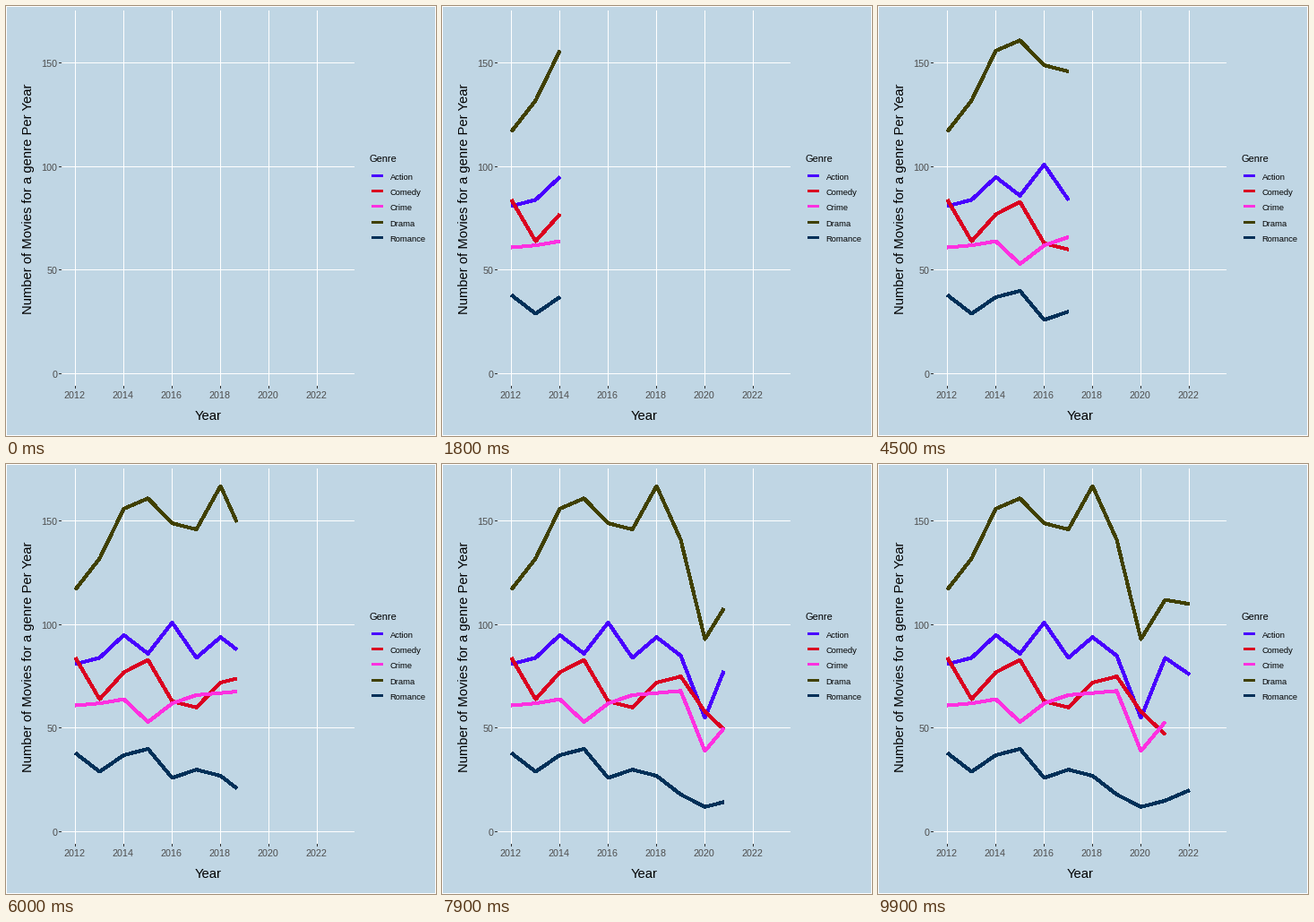
A matplotlib script that plays this animation: 480x480 px, repeating every 10 s.

```python
import matplotlib.pyplot as plt
import numpy as np
from matplotlib.animation import FuncAnimation
from matplotlib.patches import Rectangle

SIZE, FRAMES, INTERVAL = 480, 100, 100
FIRST_YEAR, SPAN = 2012, 11
PANEL_LEFT, PANEL_RIGHT, PANEL_TOP, PANEL_BOTTOM = 62, 389, 5, 424
BACKGROUND, TICK, LABEL = "#C0D6E4", "#333333", "#4D4D4D"

# Yearly counts, starting in 2012
GENRES = {
    "Action": ("#4800FF", [81, 84, 95, 86, 101, 84, 94, 85, 55, 84, 76, 4]),
    "Comedy": ("#DA0020", [84, 64, 77, 83, 63, 60, 72, 75, 58, 47, 46]),
    "Crime": ("#FF30E0", [61, 62, 64, 53, 62, 66, 67, 68, 39, 53, 41]),
    "Drama": ("#404000", [117, 132, 156, 161, 149, 146, 167, 141, 93, 112, 110, 2]),
    "Romance": ("#003058", [38, 29, 37, 40, 26, 30, 27, 18, 12, 15, 20, 11]),
}

plt.rcParams["font.family"] = "Liberation Sans"


def x_pos(step):
    return 77.5 + 27.0 * np.asarray(step)


def y_pos(count):
    return 410.5 - 2.3113 * np.asarray(count)


def pixel(value):
    """Centre of the pixel that holds a coordinate."""
    return np.floor(value) + 0.5


fig = plt.figure(figsize=(SIZE / 72, SIZE / 72), dpi=72, facecolor=BACKGROUND)
ax = fig.add_axes([0, 0, 1, 1])
ax.set(xlim=(0, SIZE), ylim=(SIZE, 0))
ax.axis("off")


def stroke(xs, ys, color, width=1, **kw):
    return ax.plot(xs, ys, color=color, lw=width, solid_capstyle="butt",
                   solid_joinstyle="round", antialiased=False, snap=False, **kw)[0]


def write(x, y, text, size, color="black", ha="left", **kw):
    ax.text(x, y, text, size=size, color=color, ha=ha, va="baseline", **kw)


def draw_axes():
    ax.add_patch(Rectangle((0.5, 0.5), SIZE - 1, SIZE - 1, fill=False,
                           ec="white", lw=1, snap=False))
    for count in range(0, 151, 50):
        y = pixel(y_pos(count))
        stroke([PANEL_LEFT, PANEL_RIGHT], [y, y], "white")
        stroke([PANEL_LEFT - 3, PANEL_LEFT], [y, y], TICK)
        write(57.3, y + 4.7, str(count), 10.8, LABEL, "right")
    for step in range(0, SPAN, 2):
        x = pixel(x_pos(step))
        stroke([x, x], [PANEL_TOP, PANEL_BOTTOM], "white")
        stroke([x, x], [PANEL_BOTTOM, PANEL_BOTTOM + 3], TICK)
        write(x - 0.7, 438.5, str(FIRST_YEAR + step), 10.8, LABEL, "center")
    write(226, 462.4, "Year", 14.7, ha="center")
    write(29, 215, "Number of Movies for a genre Per Year", 14.7, ha="center",
          rotation=90, rotation_mode="anchor")


def draw_legend():
    write(405.7, 174, "Genre", 11)
    for i, (name, (color, _)) in enumerate(GENRES.items()):
        y = pixel(189.4 + 17.28 * i)
        stroke([408, 421], [y, y], color, 3)
        write(428.7, y + 4.3, name, 9.4)


def revealed(counts, now):
    """Points passed so far plus a moving tip; a finished series loses its last point."""
    steps = np.arange(len(counts))
    if now >= steps[-1]:
        return steps[:-1], counts[:-1]
    passed = int(now) + 1
    tip = np.interp(now, steps, counts)
    return np.append(steps[:passed], now), np.append(counts[:passed], tip)


draw_axes()
draw_legend()
lines = {name: stroke([], [], color, 3, zorder=3)
         for name, (color, _) in GENRES.items()}


def update(frame):
    now = SPAN * frame / (FRAMES - 1)
    for name, (_, counts) in GENRES.items():
        steps, values = revealed(counts, now)
        lines[name].set_data(x_pos(steps), y_pos(values))
        lines[name].set_visible(frame > 0)
    return list(lines.values())


anim = FuncAnimation(fig, update, frames=FRAMES, interval=INTERVAL,
                     repeat=True, repeat_delay=0, blit=False)
plt.show()
```
